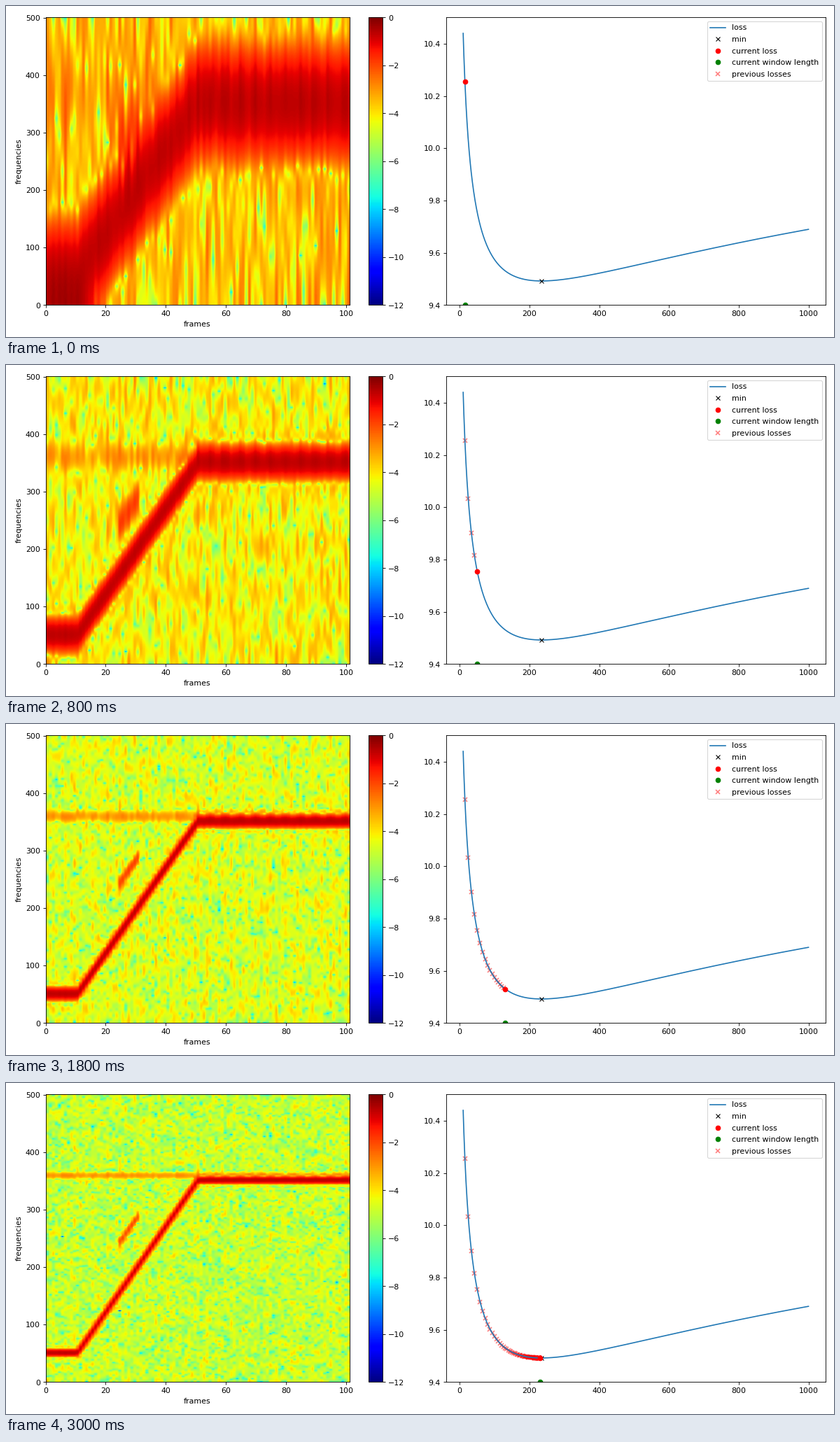
Recreate the animation shown at these times as a matplotlib script. Size 1183x473 px, loop 3200 ms.

```python
import numpy as np
import matplotlib.pyplot as plt
from matplotlib.animation import FuncAnimation

W, H = 1183, 473
DPI = W / 15
FS, HOP, SUPPORT, COLS = 1000, 100, 1000, 101
FRAMES, INTERVAL = 16, 200
LAST_STEP = 99
BEST = 235


def step_at(frame):
    """One descent step per frame at first, then ever longer jumps."""
    if frame < 7:
        return frame
    return min(round(8.3 * 1.42 ** (frame - 7)), LAST_STEP)


def window_length(step):
    return 15 + 217 * (1 - 0.9563 ** step)


def loss(length):
    """Nearly a parabola over log(length), flatter far from its minimum."""
    v = np.log(length / BEST)
    return 9.4925 + v**2 * (0.109 - 0.00586 * v - 0.0031 * v**2 + 0.00005 * v**3)


def make_signal():
    """Ramped tone, weak steady tone, short parallel burst and white noise."""
    rng = np.random.default_rng(7)
    t = np.arange(-SUPPORT // 2, COLS * HOP + SUPPORT) / FS
    phase = 2 * np.pi * np.cumsum(np.interp(t, [1, 5], [50, 350])) / FS
    burst = (t > 2.37) & (t < 3.03)
    return (np.cos(phase)
            + 0.1 * np.cos(2 * np.pi * 358 * t)
            + 0.31 * burst * np.cos(phase + 2 * np.pi * 87 * t)
            + 0.112 * rng.standard_normal(t.size))


def spectrogram(signal, length):
    k = np.arange(SUPPORT) - SUPPORT // 2
    taper = np.where(np.abs(k) < length / 2,
                     0.5 + 0.5 * np.cos(2 * np.pi * k / length), 0)
    taper /= taper.sum()
    pieces = signal[np.arange(COLS)[:, None] * HOP + np.arange(SUPPORT)]
    return np.log(np.abs(np.fft.rfft(pieces * taper, axis=1)).T + 1e-8)


def add_axes(x0, x1, top=16.5, bottom=427.5):
    return fig.add_axes([x0 / W, 1 - bottom / H, (x1 - x0) / W, (bottom - top) / H])


def add_marks(shape, color, label, **style):
    line, = ax2.plot([], [], shape, color=color, ls="", label=label, **style)
    return line


lengths = window_length(np.arange(LAST_STEP + 1))
signal = make_signal()
images = [spectrogram(signal, lengths[step_at(i)]) for i in range(FRAMES)]

fig = plt.figure(figsize=(W / DPI, (H + 0.01) / DPI), dpi=DPI, facecolor="white")

ax = add_axes(56.5, 490.6)
im = ax.imshow(images[0], origin="lower", aspect="auto", cmap="jet",
               vmin=-12, vmax=0, extent=(0, COLS, 0, SUPPORT // 2 + 1))
ax.set_xticks(range(0, 101, 20))
ax.set_yticks(range(0, 501, 100))
ax.set_xlabel("frames")
ax.set_ylabel("frequencies")
fig.colorbar(im, cax=add_axes(517.7, 538.3), ticks=range(-12, 1, 2))

ax2 = add_axes(628.5, 1171.2)
grid = np.arange(10, 1001)
ax2.plot(grid, loss(grid), label="loss")
add_marks("x", "black", "min").set_data([BEST], [loss(BEST)])
current = add_marks("o", "red", "current loss")
marker = add_marks("o", "green", "current window length")
previous = add_marks("x", "red", "previous losses", alpha=0.5, mew=1.5, zorder=1.5)
ax2.set_xlim(-39.5, 1049.5)
ax2.set_ylim(9.4, 10.5)
ax2.legend(loc="upper right", labelspacing=0.6)


def update(i):
    step = step_at(i)
    now, past = lengths[step], lengths[:step]
    im.set_data(images[i])
    current.set_data([now], [loss(now)])
    marker.set_data([now], [9.4])
    previous.set_data(past, loss(past))
    return im, current, marker, previous


anim = FuncAnimation(fig, update, frames=FRAMES, init_func=lambda: update(0),
                     interval=INTERVAL, repeat=True, repeat_delay=0, blit=False)
plt.show()
```
